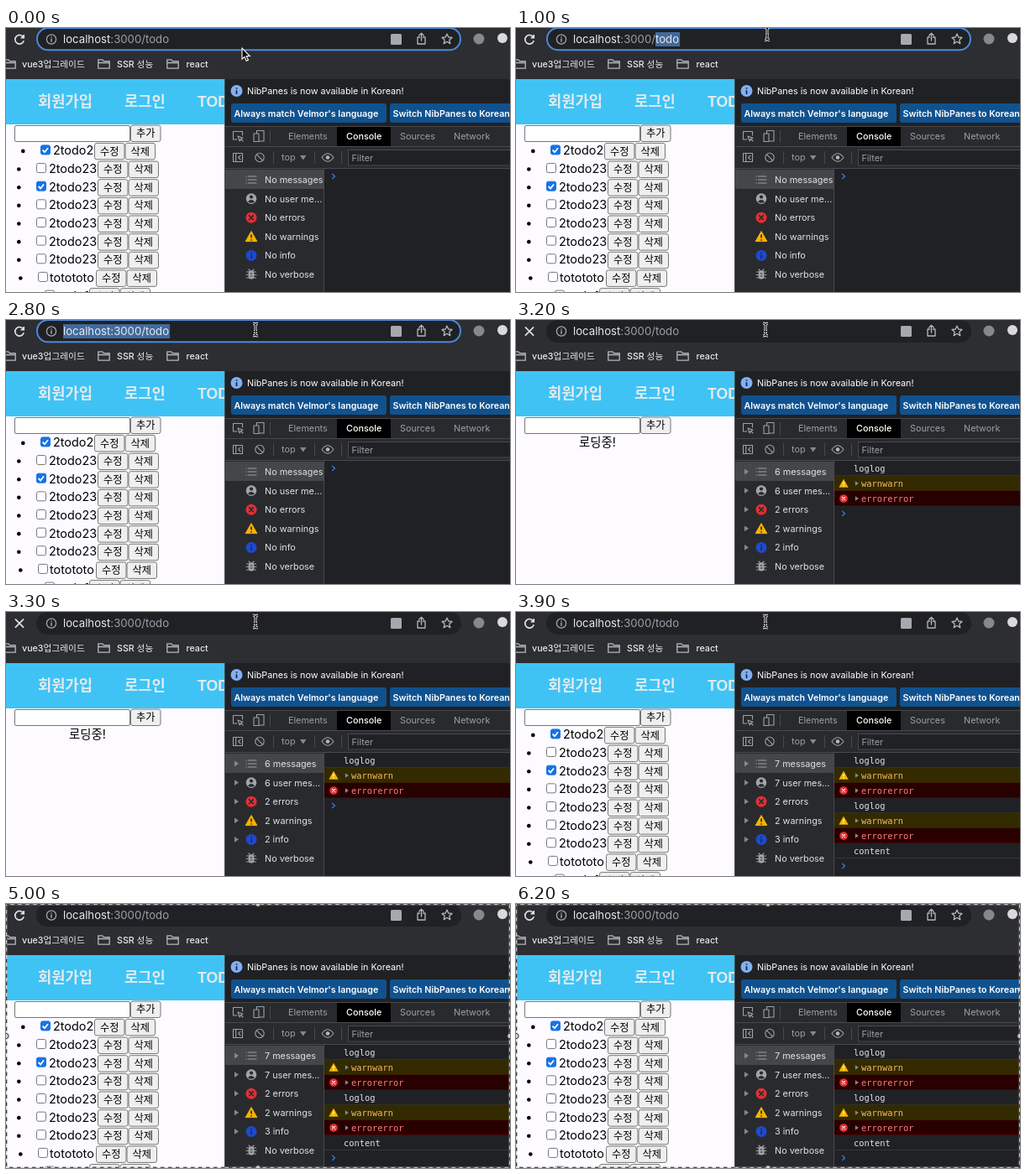
These frames come from a looping animation (600 by 315 pixels, 6300 ms). An HTML page:

```html
<!DOCTYPE html>
<html lang="ko">
<head>
<meta charset="utf-8">
<title>Todo console</title>
<style>
  html, body { margin: 0; width: 100%; height: 100%; overflow: hidden; background: #202124; }
  svg { display: block; width: 600px; height: 315px; color: #26272a; }
  text { white-space: pre; }
  .ui { font: 10.8px Inter, "Noto Sans CJK KR", sans-serif; fill: #dfe1e5; }
  .note { fill: #fff; }
  .tab { font-weight: 500; fill: #fff; }
  .btn { font-size: 10.7px; font-weight: 600; fill: #fff; }
  .dim { fill: #9aa0a6; }
  .mark { font: 500 10.7px Inter, "Noto Sans CJK KR", sans-serif; fill: #e8eaed; }
  .url { font: 13.2px Inter, sans-serif; fill: #e8eaed; }
  .nav { font: bold 17.7px "Liberation Sans", "Noto Sans CJK KR", sans-serif; fill: #e3eaed; }
  .item { font: 14.4px Inter, "Noto Sans CJK KR", sans-serif; fill: #000; }
  .key { font: 12.2px "Noto Sans CJK KR", sans-serif; fill: #000; }
  .log { font: 10.4px "DejaVu Sans Mono", monospace; fill: #e0e2e5; }
  .warn { fill: #f6bd62; }
  .error { fill: #ff7d7d; }
  .line { fill: none; stroke: #b4b8bd; stroke-width: 1.3; stroke-linecap: round; stroke-linejoin: round; }
  .panel .line { stroke: #9da1a6; stroke-width: 1.1; }
</style>
</head>
<body>
<svg id="stage" viewBox="0 0 600 315"></svg>
<script>
const LOOP = 6300;
// Times of the hard changes, in ms
const WORD = 900, ALL = 1600, ENTER = 2900, CLEAR = 3000, LOGS = 3200, READY = 3400, CROP = 4600;

const stage = document.getElementById('stage');

const rect = (x, y, w, h, fill, more = '') =>
  `<rect x="${x}" y="${y}" width="${w}" height="${h}" fill="${fill}" ${more}/>`;
const circle = (x, y, r, fill, more = '') =>
  `<circle cx="${x}" cy="${y}" r="${r}" fill="${fill}" ${more}/>`;
const text = (x, y, cls, str) => `<text x="${x}" y="${y}" class="${cls}">${str}</text>`;
const path = (d, more = 'class="line"') => `<path d="${d}" ${more}/>`;
const at = (x, y, body, scale = 1) => `<g transform="translate(${x} ${y}) scale(${scale})">${body}</g>`;
const during = (spans, body) => `<g data-on="${spans.join()}">${body}</g>`;

// ---- Icons, centred on 0,0 ----
const cross = (r, color, w) => path(`M${-r} ${-r}L${r} ${r}M${r} ${-r}L${-r} ${r}`,
  `stroke="${color}" stroke-width="${w}" stroke-linecap="round"`);
const icons = {
  list: path('M-3.5 -4H6M-3.5 0H6M-3.5 4H6M-6 -4h.3M-6 0h.3M-6 4h.3'),
  user: circle(0, 0, 6.3, '#a2a6ab') + circle(0, -2, 2.1, '#292a2d') +
    path('M-4 3.6Q0 -1 4 3.6Q0 6.6 -4 3.6', 'fill="#292a2d"'),
  error: circle(0, 0, 6.5, '#e02f35') + cross(2.3, 'currentColor', 1.5),
  warning: path('M0 -6.2L6.8 5.8H-6.8Z', 'fill="#f4b400" stroke="#f4b400" stroke-linejoin="round"') +
    path('M0 -2.4V1.8M0 3.4V5', 'stroke="currentColor" stroke-width="1.6"'),
  info: circle(0, 0, 6.5, '#1d49cf') + path('M0 -3.6V-2M0 -.6V3.6', 'stroke="currentColor" stroke-width="1.6"'),
  bug: path('M-5.5 -3H5.5M-6 .5H6M-5.5 4H5.5M-3 -6L-1 -4M3 -6L1 -4') +
    rect(-3.4, -4.4, 6.8, 10, '#a2a6ab', 'rx="3.4"') + path('M-1.4 -1H1.4M-1.4 2H1.4', 'stroke="#292a2d"'),
  folder: path('M-6.7 -5.2H-1.8L0 -3.4H6.7V5.2H-6.7ZM-6.7 -1.5H6.7'),
  arrow: path('M-2 -3.4L3 0L-2 3.4Z', 'fill="#85898e"'),
  prompt: path('M-1.8 -3L1.5 0L-1.8 3', 'fill="none" stroke="#3c78dc" stroke-width="1.3"'),
};

// ---- Browser bar ----
function browserBar() {
  const reload = path('M4.8 -2.2A5.3 5.3 0 1 0 5.2 1.6M5.2 -5.4V-1.8H1.6',
    'fill="none" stroke="#dfe1e5" stroke-width="1.7"');
  const marks = [[4.5, 19, 'vue3업그레이드'], [116.5, 132, 'SSR 성능'], [198.5, 214.5, 'react']];
  return rect(0, 0, 600, 61, '#2d2e32') +
    rect(36, 0, 506, 27, '#202124', 'rx="13.5"') +
    during([0, ENTER], rect(37, 0, 504, 26.3, 'none', 'rx="13" stroke="#4b88da" stroke-width="2"')) +
    during([0, ENTER, READY, LOOP], at(16, 13.5, reload)) +
    during([ENTER, READY], at(16, 13.5, cross(4.6, '#dfe1e5', 1.7))) +
    at(54, 13.5, circle(0, 0, 5.6, 'none', 'stroke="#a5a9ae" stroke-width="1.3"') +
      path('M0 -2.8V-2.4M0 -.6V2.8')) +
    `<g id="address"><text id="url" x="68" y="18" class="url">localhost<tspan class="dim">:3000/todo</tspan></text></g>` +
    rect(458, 7, 13, 13, '#a5a9ae', 'rx="1.5"') +
    at(494.5, 13, path('M-2 -2H-4.5V6H4.5V-2H2M0 2V-6.5M-2.8 -4L0 -6.7L2.8 -4')) +
    at(525, 13, path('M0 -6L1.8 -2L6 -1.6L2.8 1.3L3.8 5.6L0 3.3L-3.8 5.6L-2.8 1.3L-6 -1.6L-1.8 -2Z')) +
    circle(563, 13, 6.5, '#85888c') +
    circle(591, 12, 6, '#d9dadb') +
    marks.map(([x, tx, name]) => at(x, 43, icons.folder) + text(tx, 47, 'mark', name)).join('');
}

// Highlights part of the address, from the given character to the end
function highlight(start, from, to) {
  const url = document.getElementById('url');
  const full = url.textContent, rest = full.length - start;
  const x = 68 + (start ? url.getSubStringLength(0, start) : 0);
  return during([from, to], rect(x, 5, url.getSubStringLength(start, rest) + 1, 17, '#416a9b') +
    text(x, 18, 'url', full.slice(start)));
}

// ---- Todo page ----
const button = (x, y, label) =>
  rect(x + .5, y + .5, 35.5, 19.5, '#efefef', 'rx="2.5" stroke="#777"') + text(x + 7, y + 14.6, 'key', label);

function todo([bullet, box, tx, bx, label, done], i) {
  const y = 146.4 + i * 21.65;
  const tick = done ? path(`M${box + 2.6} ${y - .8}l2.4 2.6l4 -5`, 'fill="none" stroke="#fff" stroke-width="1.8"') : '';
  return circle(bullet + .3, y + .5, 2.3, '#000') +
    rect(box + .5, y - 6.5, 11, 11, done ? '#1673e6' : '#fff', `rx="2" stroke="${done ? '#1673e6' : '#777'}"`) +
    tick + text(tx, y + 5, 'item', label) + button(bx, y - 9.5, '수정') + button(bx + 36.5, y - 9.5, '삭제');
}

function page() {
  const same = done => [15, 36, 51, 109, '2todo23', done];
  const todos = [[20, 41, 56, 105, '2todo2', true], same(), same(true), same(), same(), same(), same(),
    [17, 38, 52, 107, 'totototo'], [24, 46, 62, 99, 'todof']];
  return rect(0, 61, 260, 254, '#fdfbff') + rect(0, 61, 260, 54, '#3fc3f5') +
    text(38, 94, 'nav', '회원가입') + text(141, 94, 'nav', '로그인') + text(228, 94, 'nav', 'TODO') +
    rect(10.5, 116.5, 137, 19, '#fff', 'rx="1.5" stroke="#777"') + button(148, 115.5, '추가') +
    during([0, CLEAR, READY, LOOP], todos.map(todo).join('')) +
    during([CLEAR, READY], text(75, 151, 'item', '로딩중!'));
}

// ---- Developer panel ----
const sidebar = (labels, arrows) => labels.map((label, i) => {
  const y = 181 + i * 22.6;
  return (arrows && i < 5 ? at(274, y, icons.arrow) : '') + text(308, y + 4, 'ui', label);
}).join('');

const counts = (n, infos) =>
  sidebar([`${n} messages`, `${n} user mes…`, '2 errors', '2 warnings', `${infos} info`, 'No verbose'], true);

function logs(names) {
  const rows = names.map((name, i) => {
    const y = 168 + i * 18, kind = name.startsWith('warn') ? 'warn' : name.startsWith('error') ? 'error' : '';
    const edge = color => path(`M379 ${y + 17.5}H600`, `stroke="${color}"`);
    if (!kind) return edge('#35363a') + text(402, y + 12.7, 'log', name);
    const [bg, rim, icon] = kind === 'warn' ? ['#332a00', '#4d3f00', 'warning'] : ['#290000', '#4a0000', 'error'];
    return rect(379, y - .5, 221, 18, bg) + edge(rim) +
      `<g color="#fff">${at(390, y + 9, icons[icon], .75)}</g>` +
      at(405.5, y + 9, icons.arrow, .8) + text(411, y + 12.5, 'log ' + kind, name);
  });
  return rows.join('') + at(390, 177 + names.length * 18, icons.prompt);
}

function panel() {
  const group = ['loglog', 'warnwarn', 'errorerror'];
  const kinds = ['list', 'user', 'error', 'warning', 'info', 'bug'];
  const tabs = [[336, 'Elements'], [405, 'Console'], [469, 'Sources'], [533, 'Network']];
  return '<g class="panel">' + rect(260, 61, 340, 254, '#292a2d') + rect(260, 61, 340, 56, '#202124') +
    circle(274.5, 75, 7, '#7fb0f7') + path('M274.5 71.2V72.8M274.5 74.2V79', 'stroke="#202124" stroke-width="1.7"') +
    text(287, 79, 'ui note', 'NibPanes is now available in Korean!') +
    rect(268, 90, 185, 23, '#10528f', 'rx="3"') + text(271.5, 105.5, 'ui btn', 'Always match Velmor\'s language') +
    rect(457, 90, 150, 23, '#10528f', 'rx="3"') + text(460.5, 105.5, 'ui btn', 'Switch NibPanes to Korean') +
    rect(394, 118, 64, 23, '#000') +
    path('M260 117.5H600M260 141.5H600M260 167.5H600M314.5 122V137M318.5 147V162M367.5 147V162M399.5 147V162M260.5 61V315', 'stroke="#46494d"') +
    tabs.map(([x, name], i) => text(x, 133, i === 1 ? 'ui tab' : 'ui dim', name)).join('') +
    at(276, 129, path('M-1 4H-5.5V-5.5H5.5V-1M0 0L6 2.3L3.4 3.4L2.3 6ZM3.4 3.4L6 6')) +
    at(301, 129, path('M-2.5 -3V-6.5H6V6H1M-6 -3H0V6.5H-6Z')) +
    at(276, 154.5, path('M-5.5 -5H5.5V5H-5.5ZM-2.3 -5V5M3 -2.3L.7 0L3 2.3')) +
    at(302, 154.5, circle(0, 0, 5.2, 'none', 'class="line"') + path('M-3.6 -3.6L3.6 3.6')) +
    text(328, 158, 'ui dim', 'top') + path('M350 152H357.5L353.7 157.5Z', 'fill="#85898e"') +
    at(383, 154.5, path('M-7 0Q0 -9.5 7 0Q0 9.5 -7 0Z') + circle(0, 0, 2.3, '#b4b8bd')) +
    rect(407.5, 145.5, 200, 18.5, '#202124', 'stroke="#46494d"') + text(411.5, 158.5, 'ui dim', 'Filter') +
    rect(379, 168, 221, 147, '#202124') + rect(261, 169, 117, 23, '#454649') + rect(378, 168, 1, 147, '#46494d') +
    kinds.map((kind, i) => at(292, 181 + i * 22.6, icons[kind])).join('') +
    during([0, LOGS], sidebar(['No messages', 'No user me…', 'No errors', 'No warnings', 'No info', 'No verbose']) + logs([])) +
    during([LOGS, READY], counts(6, 2) + logs(group)) +
    during([READY, LOOP], counts(7, 3) + logs([...group, ...group, 'content'])) + '</g>';
}

// ---- Overlays ----
const handles = [[300, 0], [300, 315], [0, 157.5], [600, 157.5]];
const crop = rect(.7, .7, 598.6, 313.6, 'none', 'stroke="#d8d8d8" stroke-width="1.1"') +
  rect(.7, .7, 598.6, 313.6, 'none', 'stroke="#222" stroke-width="1.1" stroke-dasharray="4.5 4.5"') +
  handles.map(([x, y]) => circle(x, y, 3.2, '#d0d0d0', 'stroke="#333"')).join('');
const beam = 'M-3 -7.5Q0 -7.5 0 -5Q0 -7.5 3 -7.5M0 -5V5M-3 7.5Q0 7.5 0 5Q0 7.5 3 7.5M-2 2H2';
const pointer = during([0, 200], path('M0 0V13L3 10.3L5.2 15.3L7.4 14.3L5.2 9.5H9.3Z',
    'fill="#000" stroke="#fff" stroke-width="1.1"')) +
  during([200, CROP], path(beam, 'fill="none" stroke="#eee" stroke-width="3"') +
    path(beam, 'fill="none" stroke="#111" stroke-width="1.2"'));

stage.innerHTML = page() + browserBar() + panel() + during([CROP, LOOP], crop) + `<g id="pointer">${pointer}</g>`;
document.getElementById('address').innerHTML += highlight(15, WORD, ALL) + highlight(0, ALL, ENTER);

const parts = [...stage.querySelectorAll('[data-on]')].map(el => ({ el, spans: el.dataset.on.split(',').map(Number) }));
const pointerEl = document.getElementById('pointer');
const ease = (t, a, b) => {
  const p = Math.min(1, Math.max(0, (t - a) / (b - a)));
  return p * p * (3 - 2 * p);
};

function draw(t) {
  for (const { el, spans } of parts) {
    const on = spans.some((from, i) => i % 2 === 0 && t >= from && t < spans[i + 1]);
    el.style.display = on ? '' : 'none';
  }
  const rise = ease(t, 0, WORD), settle = ease(t, 1500, 2200);
  pointerEl.setAttribute('transform', `translate(${281 + 18 * rise - 2 * settle} ${24 - 17 * rise + 4.5 * settle})`);
}

const begin = performance.now();
function tick() {
  draw((performance.now() - begin) % LOOP);
  requestAnimationFrame(tick);
}
tick();
</script>
</body>
</html>
```
